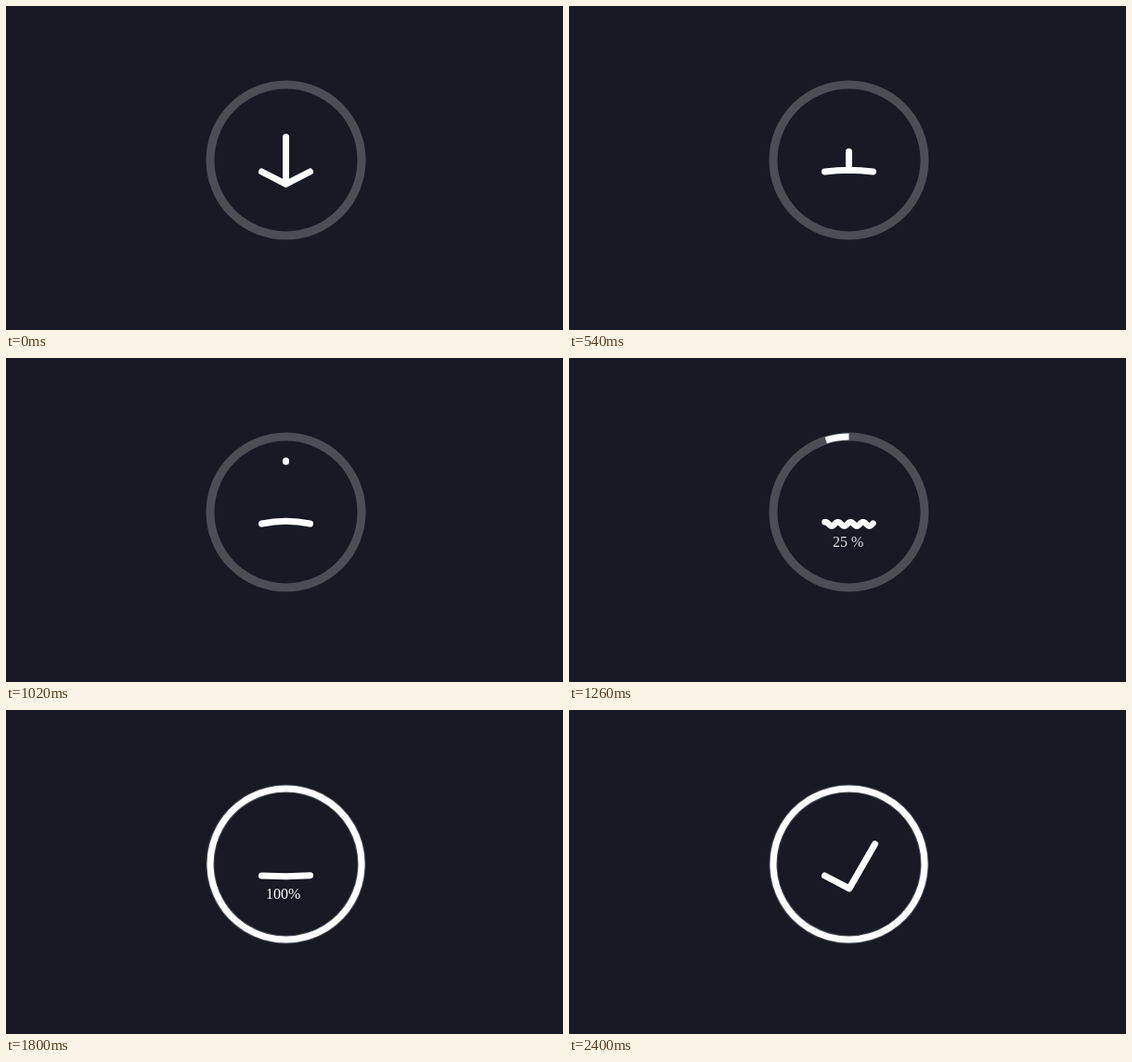
Animation of 600 by 350 pixels, one loop 2.67 s. Source, as an HTML page:

```html
<!DOCTYPE html>
<html lang="en">
<head>
<meta charset="utf-8">
<title>Download button</title>
<style>
  html, body { margin: 0; width: 100%; height: 100%; overflow: hidden; background: #171924; }
  svg { display: block; width: 600px; height: 350px; }
  circle, path { fill: none; stroke: #fff; stroke-width: 7; stroke-linecap: round; stroke-linejoin: round; }
  circle { stroke-width: 9; }
  #track { stroke: #4c4e56; }
  #arc { stroke-linecap: butt; }
  text { font: 16px "Liberation Serif", "Times New Roman", serif; fill: #fff; }
</style>
</head>
<body>
<svg viewBox="0 0 600 350">
  <circle id="track" cx="301.5" cy="166.5" r="81.5"/>
  <path id="arc"/>
  <path id="stem"/>
  <path id="line"/>
  <g id="label">
    <text id="count" x="292" y="204" text-anchor="middle">0</text>
    <text x="304" y="204">%</text>
  </g>
</svg>
<script>
const LOOP = 2670, STEP = 30;
const CX = 301.5, CY = 166.5, R = 81.5;
const LEFT = 275.5, RIGHT = 327.5, BASE = 179;
const T = { start: 150, launch: 690, peak: 810, load: 1080, land: 1140, full: 1800, check: 1770, end: 2400 };

const $ = id => document.getElementById(id);
const arc = $('arc'), stem = $('stem'), line = $('line'), label = $('label'), count = $('count');
const lerp = (a, b, u) => a + (b - a) * u;
const ramp = (t, a, b) => Math.min(1, Math.max(0, (t - a) / (b - a)));
const show = (el, on) => el.setAttribute('visibility', on ? 'visible' : 'hidden');

function bezier(x1, y1, x2, y2) {
  const at = (p, a, b) => 3 * (1 - p) ** 2 * p * a + 3 * (1 - p) * p * p * b + p ** 3;
  return x => {
    let lo = 0, hi = 1;
    for (let i = 0; i < 24; i++) {
      const p = (lo + hi) / 2;
      if (at(p, x1, x2) < x) lo = p; else hi = p;
    }
    return at(lo, y1, y2);
  };
}
const arcEase = bezier(.425, 0, .8, .85);

// Arrow head that bends from a V into an arch
function bow(mid, round) {
  const c = lerp((BASE + mid) / 2, mid, round), q = (LEFT + CX) / 2;
  return `M${LEFT} ${BASE}Q${q} ${c} ${CX} ${mid}Q${2 * CX - q} ${c} ${RIGHT} ${BASE}`;
}

function wave(t) {
  const amp = 2.2 * ramp(t, T.load, 1170) * (1 - ramp(t, 1700, 1790));
  const shift = 283 + (t - 1260) / 24;
  let d = '';
  for (let x = LEFT; x <= RIGHT; x++) {
    const y = BASE + .3 + amp * Math.cos((x - shift) * 2 * Math.PI / 13.5);
    d += `${d ? 'L' : 'M'}${x} ${y.toFixed(2)}`;
  }
  return d;
}

function checkMark(u) {
  return `M${LEFT} ${BASE}L${lerp(CX, 302, u)} ${lerp(BASE, 192.8, u)}` +
    `L${lerp(RIGHT, 329.6, u)} ${lerp(BASE, 144.7, u ** 1.5)}`;
}

function drawLine(t) {
  if (t >= T.full) return checkMark(ramp(t, T.check, T.end));
  if (t >= T.load) return wave(t);
  if (t >= T.peak) return bow(lerp(167, BASE, ramp(t, T.peak, T.load)), 1);
  const u = ramp(t, T.start, T.peak);
  return bow(lerp(192.3, 167, u), u);
}

function drawStem(t) {
  if (t < T.launch) {
    const u = t < 180 ? 0 : ramp(t, T.start, T.launch);
    return `M${CX} ${lerp(141.5, 163.2, u)}V${lerp(192, 164, u)}`;
  }
  const y = lerp(163.6, 85, ramp(t, T.launch, T.land) ** 1.33);
  return `M${CX} ${y - .5}v1`;
}

function drawArc(u) {
  const a = Math.min(u, .9999) * 2 * Math.PI;
  const x = CX - R * Math.sin(a), y = CY - R * Math.cos(a);
  return `M${CX} ${CY - R}A${R} ${R} 0 ${u > .5 ? 1 : 0} 0 ${x} ${y}${u >= 1 ? 'Z' : ''}`;
}

function render(t) {
  const held = t < 180 ? 0 : t;
  line.setAttribute('d', drawLine(held));
  line.style.strokeWidth = t >= T.load && t < T.full ? 6.5 : 7;
  stem.setAttribute('d', drawStem(held));
  show(stem, t < T.land);
  arc.setAttribute('d', drawArc(arcEase(ramp(t, T.land, T.full))));
  show(arc, t > T.land);
  count.textContent = Math.round(100 * ramp(t, T.load, T.full));
  label.setAttribute('opacity', ramp(t, T.load - 30, 1290) * (1 - ramp(t, T.full, 1980)));
}

const begin = performance.now();
function tick() {
  const t = (performance.now() - begin) % LOOP;
  render(Math.floor(t / STEP) * STEP);
  requestAnimationFrame(tick);
}
tick();
</script>
</body>
</html>
```
